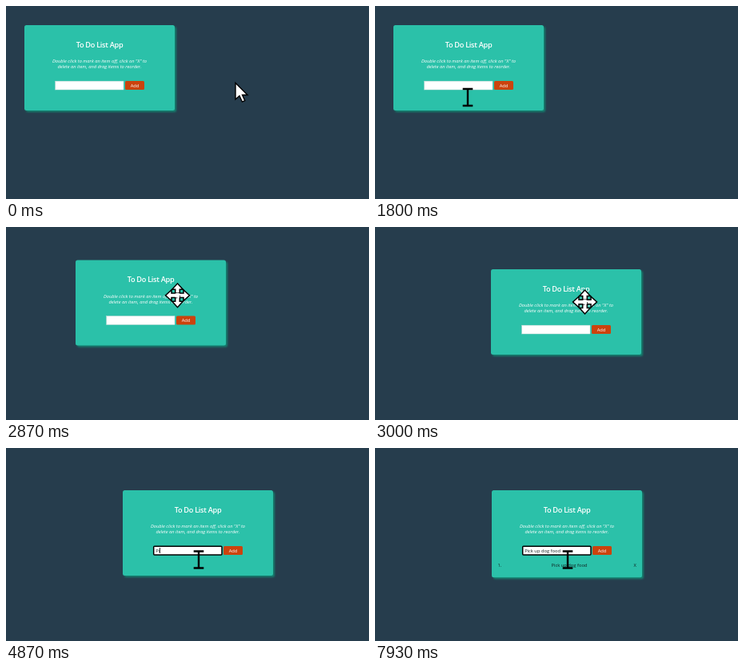
Write an HTML page that moves like this. It is 454 by 242 pixels and loops after 8000 ms.

```html
<!DOCTYPE html>
<html lang="en">
<head>
<meta charset="utf-8">
<title>To Do List App</title>
<style>
  html, body { margin: 0; width: 100%; height: 100%; overflow: hidden; background: #263d4d; }
  svg { display: block; width: 454px; height: 242px; }
  text { font: 5.75px "Open Sans", sans-serif; fill: #fff; }
  .mid { text-anchor: middle; }
  .title { font-size: 9.2px; font-weight: 600; letter-spacing: -.3px; }
  .hint { font-style: italic; }
  .dark { fill: #10201f; }
  #card { filter: drop-shadow(2px 2px 1px #14816f); }
</style>
</head>
<body>
<svg viewBox="0 0 454 242">
  <g id="app">
    <rect id="card" x="23" y="24" width="188" height="107" rx="2.5" fill="#2bc1a9"/>
    <text class="mid title" x="117" y="51.5">To Do List App</text>
    <text class="mid hint" x="117" y="71">Double click to mark an item off, click on "X" to</text>
    <text class="mid hint" x="117" y="78.2">delete an item, and drag items to reorder.</text>
    <rect id="field" x="61.7" y="94.2" width="85.3" height="10.8" fill="#fff"/>
    <text id="typed" class="dark" x="64.2" y="101.7" xml:space="preserve"></text>
    <rect id="caret" y="96" width=".8" height="7" fill="#000"/>
    <rect x="149" y="94" width="24" height="11" rx="1.5" fill="#cb430d"/>
    <text class="mid" x="161" y="101.7">Add</text>
    <g id="item">
      <text class="dark" x="30.5" y="119.5">1.</text>
      <text class="mid dark" x="120" y="119.5">Pick up dog food</text>
      <text class="dark" x="200.5" y="119.5">X</text>
    </g>
  </g>
  <g id="cursor" stroke="#000">
    <path id="arrow" fill="#fff" stroke-width="1.4" d="M0 .5V21L5 16.7 8.4 24.2 11.8 22.7 8.5 15.5H15Z"/>
    <path id="beam" fill="none" stroke-width="2.4" d="M-6.3 -10.5H6.3M-6.3 10.5H6.3M0 -10.5V10.5"/>
    <g id="move"></g>
  </g>
</svg>
<script>
const $ = id => document.getElementById(id);
const STEP = 200 / 3, LOOP = 8000;
const TEXT = 'Pick up dog food';

// All keys are in steps of 1/15 s.
const cursorKeys = [
  [0, 287, 96, 'arrow'], [2, 153, 175, 'arrow'], [9, 153, 175, 'arrow'],
  [12, 194, 150, 'arrow'], [14, 190, 122, 'move'], [18, 41, 122, 'move'],
  [22, 107, 125, 'move'], [24, 107, 125, 'move'], [26, 113, 117, 'beam'],
  [27, 116, 114.5, 'beam'], [28, 130, 106, 'move'], [31, 191, 80, 'move'],
  [35, 140, 64, 'move'], [39, 140, 64, 'move'], [41, 166.5, 77.5, 'move'],
  [45, 262.5, 94, 'move'], [47, 263.5, 94, 'move'], [52, 318, 73, 'move'],
  [54, 262, 124, 'move'], [55, 241, 140, 'beam']
];
const dragKeys = [[0, 0, 0], [39, 0, 0], [41, 6, 6], [45, 122, 29], [46, 123, 29]];
const typeKeys = [70, 73, 75, 78, 80, 82, 84, 87, 91, 93, 95, 97, 103, 105, 107, 109];
const FOCUS = 55, RING = 58, CARET = 64, ADDED = 113;

// Four-headed arrow from one arm turned by quarters.
const arm = 'M-2.8 0V-7.5H-6.8L0 -15 6.8 -7.5H2.8V0';
const arms = (fill, stroke) => [0, 90, 180, 270].map(a =>
  `<path d="${arm}" transform="rotate(${a})" fill="${fill}" stroke="${stroke}" stroke-width="1.5"/>`).join('');
$('move').innerHTML = arms('#fff', '#000') + '<rect x="-2.1" y="-2.8" width="4.2" height="5.6" fill="#fff" stroke="none"/>' +
  '<rect x="-2.8" y="-2.1" width="5.6" height="4.2" fill="#fff" stroke="none"/>';

function at(keys, k) {
  const i = keys.findLastIndex(key => key[0] <= k);
  const a = keys[i], b = keys[i + 1] || a;
  const p = b === a ? 0 : (k - a[0]) / (b[0] - a[0]);
  return { x: a[1] + (b[1] - a[1]) * p, y: a[2] + (b[2] - a[2]) * p, kind: a[3] };
}

const place = (id, { x, y }) => $(id).setAttribute('transform', `translate(${x} ${y})`);
const show = (id, on) => { $(id).style.display = on ? '' : 'none'; };

function draw(now) {
  const k = Math.floor((now % LOOP + 4) / STEP) % 120;
  const cursor = at(cursorKeys, k);
  place('app', at(dragKeys, k));
  place('cursor', cursor);
  for (const kind of ['arrow', 'beam', 'move']) show(kind, kind === cursor.kind);

  const field = $('field');
  field.setAttribute('stroke', k < FOCUS ? '#c8d8d6' : k < RING ? '#555' : '#000');
  field.setAttribute('stroke-width', k < FOCUS ? .5 : k < RING ? .8 : 1.5);
  field.setAttribute('rx', k < RING ? 0 : 1);

  $('typed').textContent = TEXT.slice(0, typeKeys.filter(key => key <= k).length);
  $('caret').setAttribute('x', 64.2 + $('typed').getComputedTextLength());
  show('caret', k >= CARET && k < ADDED);
  show('item', k >= ADDED);
  $('card').setAttribute('height', k < ADDED ? 107 : 109.3);
}

const start = performance.now();
(function tick() {
  draw(performance.now() - start);
  requestAnimationFrame(tick);
})();
</script>
</body>
</html>
```
